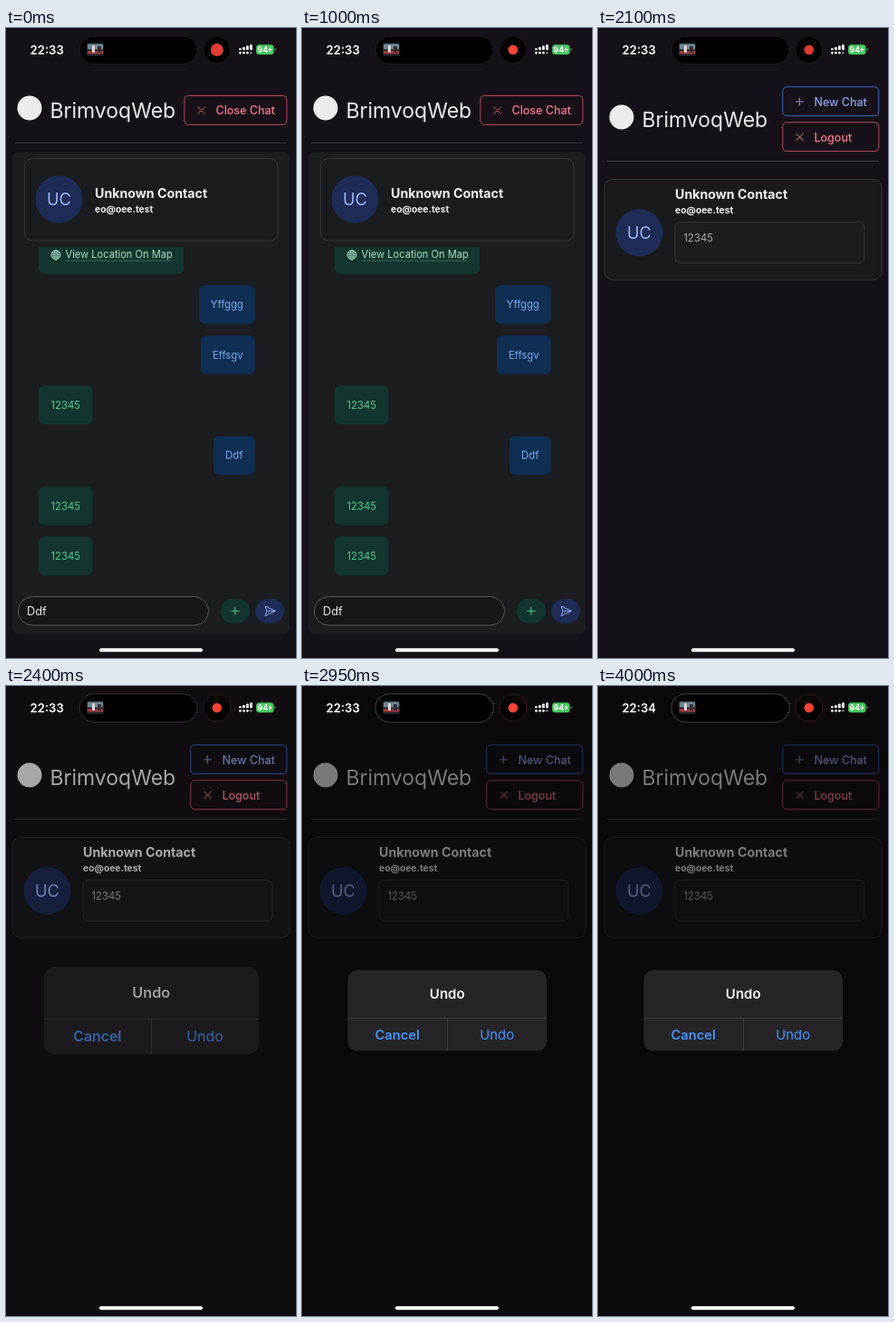
Animation of 320 by 693 pixels, one loop 4.05 s. Source, as an HTML page with a canvas:

```html
<!DOCTYPE html>
<html lang="en">
<head>
<meta charset="utf-8">
<title>Chat app</title>
<style>
html, body { margin: 0; width: 100%; height: 100%; overflow: hidden; background: #161118; }
canvas { display: block; width: 320px; height: 693px; }
</style>
</head>
<body>
<canvas id="stage"></canvas>
<script>
const W = 320, H = 693, LOOP = 4050, STEP = 50;
const OPEN_LIST = 1950, OPEN_ALERT = 2350, NEXT_MINUTE = 3400;
const APP = 'BrimvoqWeb', MAIL = 'eo@oee.test', CONTACT = 'Unknown Contact';
const GREEN = '#12352f', MINT = '#50c893', NAVY = '#0f2e53', SKY = '#73a9f6';
const PINK = '#fa7690', PANEL = '#1c1d20', LINE = '#36363b', INDIGO = '#1f2c58';

const canvas = document.getElementById('stage');
const ctx = canvas.getContext('2d');
const dpr = window.devicePixelRatio || 1;
canvas.width = W * dpr;
canvas.height = H * dpr;

function box(x, y, w, h, r, fill, stroke, lw = 1) {
  ctx.beginPath();
  ctx.roundRect(x, y, w, h, r);
  if (fill) { ctx.fillStyle = fill; ctx.fill(); }
  if (stroke) { ctx.strokeStyle = stroke; ctx.lineWidth = lw; ctx.stroke(); }
}

function disc(x, y, r, fill, stroke) {
  box(x - r, y - r, 2 * r, 2 * r, r, fill, stroke);
}

function path(points, color, lw = 1, close = false) {
  ctx.beginPath();
  points.forEach(([x, y]) => ctx.lineTo(x, y));
  if (close) ctx.closePath();
  ctx.strokeStyle = color;
  ctx.lineWidth = lw;
  ctx.stroke();
}

function text(str, x, y, size, color, weight = 400, align = 'left') {
  ctx.font = `${weight} ${size}px Inter, "Liberation Sans", sans-serif`;
  ctx.textAlign = align;
  ctx.fillStyle = color;
  ctx.fillText(str, x, y);
}

function plus(x, y, r, color) {
  path([[x - r, y], [x + r, y]], color);
  path([[x, y - r], [x, y + r]], color);
}

function cross(x, y, r, color) {
  path([[x - r, y - r], [x + r, y + r]], color);
  path([[x - r, y + r], [x + r, y - r]], color);
}

function globe(x, y, r, color) {
  disc(x, y, r, null, color);
  ctx.beginPath();
  ctx.ellipse(x, y, r * 0.45, r, 0, 0, 7);
  ctx.stroke();
  path([[x, y - r], [x, y + r]], color, 0.8);
  for (const d of [-0.45, 0, 0.45]) {
    const half = r * Math.sqrt(1 - d * d);
    path([[x - half, y + d * r], [x + half, y + d * r]], color, 0.8);
  }
}

function brand(y) {
  disc(26, y - 3, 13.5, '#eeebef');
  text(APP, 48.5, y + 7.8, 23, '#eeebef');
}

function avatar(x, y) {
  disc(x, y, 26, INDIGO);
  text('UC', x, y + 6.7, 18.3, '#9fb3fa', 400, 'center');
}

function identity(x, y) {
  text(CONTACT, x, y, 14.2, '#f0f0f2', 700);
  text(MAIL, x, y + 15.5, 10.3, '#f0f0f2', 700);
}

function button(label, x, y, border, color) {
  box(x, y, 309.8 - x, 31.8, 4.5, null, border, 0.9);
  text(label, x + 34.7, y + 20.7, 12.5, color, 500);
}

function bubble(str, x, y, right, mine) {
  box(x, y, right - x, 42.5, 6, mine ? NAVY : GREEN);
  text(str, (x + right) / 2, y + 25.4, 11.3, mine ? SKY : MINT, 400, 'center');
}

function chatPage() {
  brand(91);
  button('Close Chat', 196.8, 74.5, '#c94e70', PINK);
  cross(215.5, 90.5, 4, '#c9405f');
  path([[10, 126.5], [310, 126.5]], '#37323a');

  box(7, 136.5, 306, 530, 7, PANEL);
  box(20.5, 143.5, 279.5, 90.5, 9, '#1b1c1f', LINE);
  avatar(58.5, 188.5);
  identity(98, 187);

  box(36, 241, 160, 29.5, [0, 0, 6, 6], GREEN);
  globe(55, 249.5, 5, '#a8dcc4');
  text('View Location On Map', 65.5, 253.3, 11.1, '#a8dcc4');
  path([[65.5, 256], [183, 256]], '#4a8069', 0.7);

  bubble('Yffggg', 213, 283, 274.5, true);
  bubble('Effsgv', 215, 338.3, 274.5, true);
  bubble('12345', 36, 393.6, 95.5, false);
  bubble('Ddf', 229, 449, 274.5, true);
  bubble('12345', 36, 504.2, 95.5, false);
  bubble('12345', 36, 559.6, 95.5, false);

  box(13.5, 625.5, 210, 31.5, 16, '#161719', '#56565a');
  text('Ddf', 23, 646, 12.8, '#e6e6e8');
  box(236.5, 628, 32.5, 26.5, 13.3, GREEN);
  plus(252.8, 641.3, 4.5, MINT);
  box(275, 628, 32, 26.5, 13.3, INDIGO);
  path([[286, 636], [297.5, 641.3], [286, 646.6], [287.8, 641.3]], '#8fa8f5', 1, true);
  path([[287.8, 641.3], [297, 641.3]], '#8fa8f5');
}

function listPage() {
  brand(101);
  button('New Chat', 203.8, 64.8, '#3d6fd0', '#86a5ee');
  plus(222.5, 81, 4.5, '#7795df');
  button('Logout', 203.8, 103.8, '#c94e70', PINK);
  cross(222.5, 120, 4, PINK);
  path([[10, 146.5], [310, 146.5]], '#403b42');

  box(7, 166.5, 306, 110.5, 9, '#1a1a1d', '#323237');
  avatar(45.5, 225.3);
  identity(85, 188);
  box(85, 213.5, 209, 45, 6, '#1b1d1f', LINE);
  text('12345', 94.5, 235.3, 11.3, '#a9a9ad');
}

function alertBox(p) {
  ctx.fillStyle = `rgba(0,0,0,${0.49 * p})`;
  ctx.fillRect(0, 0, W, H);
  const k = 1.2 - 0.2 * p;
  ctx.save();
  ctx.globalAlpha = p;
  ctx.translate(160.2, 357);
  ctx.scale(k, k);
  ctx.translate(-160.2, -357);
  box(50.5, 312.5, 219.5, 89, 11, '#272427');
  path([[50.5, 365.5], [270, 365.5]], '#434045', 0.8);
  path([[160.5, 365.5], [160.5, 401.5]], '#434045', 0.8);
  text('Undo', 160.2, 344.2, 15, '#f6f5f7', 600, 'center');
  text('Cancel', 105.2, 388.9, 14.7, '#4392fb', 600, 'center');
  text('Undo', 215.2, 388.9, 14.8, '#4392fb', 400, 'center');
  ctx.restore();
}

function statusBar(t, p) {
  text(t < NEXT_MINUTE ? '22:33' : '22:34', 45.2, 28.5, 13.1, '#fff', 600, 'center');

  const mix = (a, b) => Math.round(a + (b - a) * p);
  box(81, 8.8, 130.5, 31, 15.5, '#000', `rgb(${mix(34, 65)},${mix(30, 63)},${mix(35, 65)})`);
  box(89, 16.5, 19, 14.5, 2, '#20232c');
  box(90, 17.5, 17, 6, 1, '#6d8994');
  box(90, 25, 17, 3.5, 0, '#9a3b3d');
  box(95, 19, 3, 8, 1, '#ddd8d2');
  box(101, 20, 4, 7, 1, '#332c36');

  // The recording light starts large, settles, then pulses.
  disc(232.8, 24, 15.3, '#000', `rgb(${mix(34, 70)},${mix(30, 22)},${mix(35, 32)})`);
  const glow = 0.5 - 0.5 * Math.cos(2 * Math.PI * (t / 1600 - 0.17));
  const radius = 5.3 + 1.6 * Math.exp(-t / 200);
  disc(232.8, 24, radius, `rgb(${215 + 40 * glow},${58 + 11 * glow},${48 + 6 * glow})`);

  for (let i = 0; i < 4; i++) {
    const x = 257 + i * 4, h = 2 + i * 1.3;
    box(x, 24.2 - h, 2.8, h, 0.8, '#fff');
    disc(x + 1.4, 27.3, 1.4, i < 3 ? '#fff' : '#77747a');
  }

  box(276, 18.3, 19.5, 11, 3.5, '#42c85c');
  box(296.3, 22, 1.2, 3.6, 0.6, '#4c8458');
  text('94', 283.3, 27.2, 8.8, '#fff', 700, 'center');
  ctx.beginPath();
  [[292.4, 20.3], [289.4, 24.4], [291.3, 24.4], [290.6, 27.5], [293.7, 23.2], [291.8, 23.2]]
    .forEach(([x, y]) => ctx.lineTo(x, y));
  ctx.fillStyle = '#fff';
  ctx.fill();
}

function draw(t) {
  ctx.setTransform(dpr, 0, 0, dpr, 0, 0);
  ctx.fillStyle = '#161118';
  ctx.fillRect(0, 0, W, H);
  const p = t > OPEN_ALERT ? 1 - Math.exp((OPEN_ALERT - t) / 54) : 0;
  if (t < OPEN_LIST) chatPage();
  else listPage();
  if (p) alertBox(p);
  statusBar(t, p);
  box(103, 682.3, 114, 4, 2, '#fff');
}

const start = performance.now();
function tick() {
  const t = (performance.now() - start) % LOOP;
  draw(Math.floor(t / STEP) * STEP);
  requestAnimationFrame(tick);
}
tick();
</script>
</body>
</html>
```
